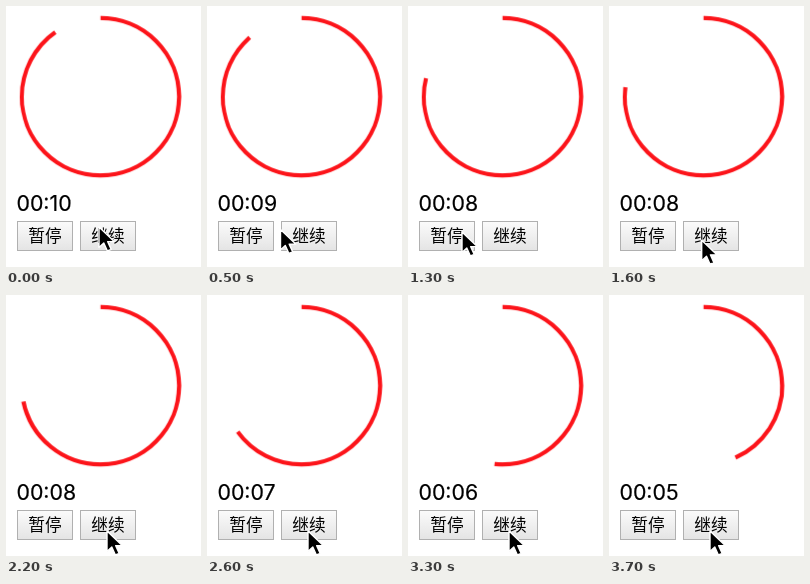
Animation, 195 px wide and 261 px high, one loop 3.8 s. Source, as an HTML page:

```html
<!DOCTYPE html>
<html lang="zh">
<head>
<meta charset="utf-8">
<title>Countdown ring</title>
<style>
  html, body { margin: 0; width: 100%; height: 100%; overflow: hidden; background: #fff; }
  svg { display: block; width: 100vw; height: 100vh; }
  #ring { fill: none; stroke: #fc141a; stroke-width: 4.2; filter: blur(.4px); }
  #label { font: 21.3px Inter, Roboto, sans-serif; stroke: #000; stroke-width: .2; }
  .button rect { fill: url(#face); stroke: #b0b0b0; }
  .button text { font: 500 16.7px "Noto Sans CJK SC", "Noto Sans CJK", sans-serif; text-anchor: middle; }
  #cursor path { fill: #000; stroke: #fff; stroke-width: 1.4; stroke-linejoin: round; }
</style>
</head>
<body>
<svg viewBox="0 0 195 261">
  <defs>
    <linearGradient id="face" x2="0" y2="1">
      <stop offset="0" stop-color="#fbfbfb"/>
      <stop offset="1" stop-color="#e4e4e4"/>
    </linearGradient>
  </defs>
  <circle id="ring" cx="94.5" cy="90.7" r="78.7" pathLength="360" transform="rotate(-90 94.5 90.7)"/>
  <text id="label" x="10.5" y="204.7"></text>
  <g class="button"><rect x="11.5" y="215.5" width="55" height="29"/><text x="39" y="235.7">暂停</text></g>
  <g class="button"><rect x="74.5" y="215.5" width="55" height="29"/><text x="102" y="235.7">继续</text></g>
  <g id="cursor"><path d="M0 0V20.5L4.8 16L8.4 24L12.2 22.4L8.7 14.6H15.2Z"/></g>
</svg>
<script>
  const LOOP = 3800, STEP = 100, DEGREES_PER_SECOND = 36;
  const PAUSE = 1400, RESUME = 1800, END = 3700;

  const ring = document.getElementById('ring');
  const label = document.getElementById('label');
  const cursor = document.getElementById('cursor');

  const progress = (time, from, to) => Math.min(1, Math.max(0, (time - from) / (to - from)));
  const easeIn = (p, power) => p ** power;
  const easeOut = (p, power) => 1 - (1 - p) ** power;

  // The ring shrinks in two runs, standing still between pause and resume.
  function remaining(time) {
    return 325 - 48 * easeIn(progress(time, 0, PAUSE), 2)
               - 121 * easeIn(progress(time, RESUME, END), 1.2);
  }

  // The pointer drifts to the pause button, then darts back to resume.
  function pointer(time) {
    const away = progress(time, 0, 1000);
    const back = easeOut(progress(time, 1500, 1700), 2.5);
    return [93 - 39 * away + 47 * back, 221 + 5 * away + 10 * back];
  }

  const start = performance.now();

  function draw() {
    const elapsed = (performance.now() - start) % LOOP;
    const time = Math.floor(elapsed / STEP) * STEP;
    const angle = remaining(time);
    const seconds = Math.ceil(angle / DEGREES_PER_SECOND);
    ring.setAttribute('stroke-dasharray', `${angle} 360`);
    label.textContent = '00:' + String(seconds).padStart(2, '0');
    cursor.setAttribute('transform', `translate(${pointer(time)})`);
    requestAnimationFrame(draw);
  }
  draw();
</script>
</body>
</html>
```
